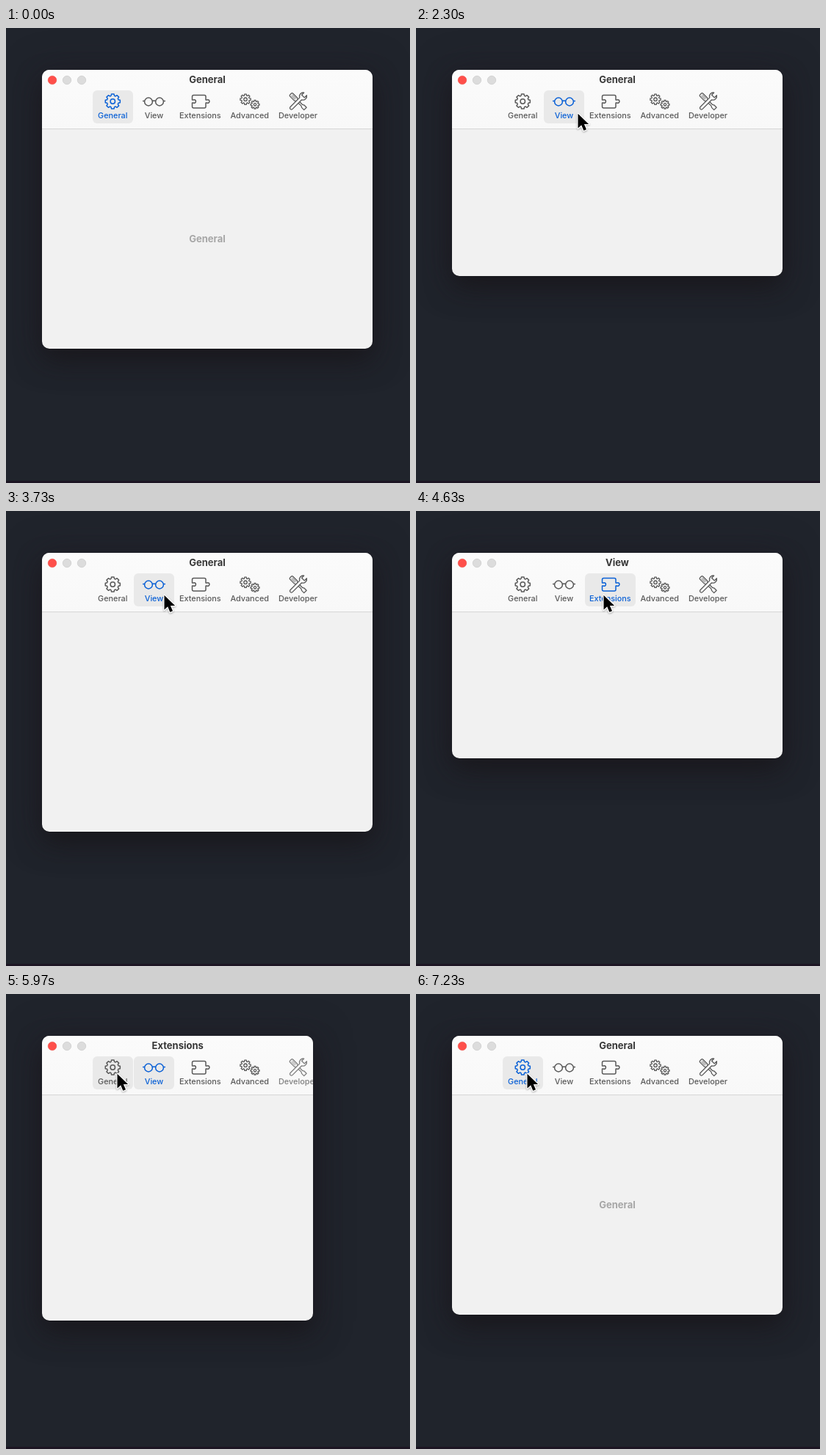
Write an HTML page that moves like this. It is 550x620 px and loops after 8.26 s.

```html
<!DOCTYPE html>
<html lang="en">
<head>
<meta charset="utf-8">
<title>Settings window</title>
<style>
  html, body { margin: 0; width: 100%; height: 100%; overflow: hidden; background: #20242c; }
  #stage { position: absolute; left: 0; top: 0; width: 550px; height: 620px; overflow: hidden; }
  #stage::after { content: ""; position: absolute; left: 0; right: 0; bottom: 0; height: 3px; background: #1c1523; }
  #win {
    position: absolute; left: 49px; top: 57px; overflow: hidden; border-radius: 10px;
    background: #f1f1f1;
    box-shadow: 0 0 1px rgba(0,0,0,.5), 0 16px 34px rgba(20,18,20,.6), 0 4px 50px rgba(38,30,42,.5);
  }
  #bar { position: absolute; left: 0; right: 0; top: 0; height: 80px; background: linear-gradient(#fbfbfb, #f8f8f8); border-bottom: 1px solid #d6d6d6; }
  svg { position: absolute; overflow: visible; }
  #ui { left: -49px; top: -57px; }
  text { font-family: Inter, "Noto Sans", sans-serif; text-anchor: middle; }
  .label { font-size: 10.85px; font-weight: 500; stroke: none; fill: currentColor; }
  .head { font-size: 13px; font-weight: 700; fill: #373737; }
  #body { fill: #a6a6a6; }
  .tab { color: #595959; fill: none; stroke: currentColor; stroke-width: 1.5; stroke-linejoin: round; stroke-linecap: round; }
  .tab .back { fill: #e9e9e9; stroke: none; visibility: hidden; }
  .tab.lit .back { visibility: visible; }
  .tab.on { color: #0b61d6; }
  .thin { stroke-width: 1.3; }
  #cursor { left: 0; top: 0; filter: drop-shadow(0 1px 1px rgba(0,0,0,.3)); }
</style>
</head>
<body>
<div id="stage">
  <div id="win">
    <div id="bar"></div>
    <svg id="ui" width="550" height="620">
      <circle cx="63" cy="71" r="5.8" fill="#fe4f4a" stroke="#e8453f" stroke-width=".5"/>
      <g fill="#dcdcdc" stroke="#cbcbcb" stroke-width=".7">
        <circle cx="83" cy="71" r="5.7"/>
        <circle cx="103" cy="71" r="5.7"/>
      </g>
      <g id="tabs"></g>
      <text id="title" class="head" y="75"></text>
      <text id="body" class="head"></text>
    </svg>
  </div>
  <svg id="cursor" width="20" height="30">
    <path d="M0 .8V20.6L4.7 16.3 7.8 23.8 11.5 22.2 8.4 14.9H14.6Z" fill="#000" stroke="#fff" stroke-width="2.6" stroke-linejoin="round" paint-order="stroke"/>
  </svg>
</div>
<script>
const LOOP = 8260, RESIZE = 250;
const $ = id => document.getElementById(id);

// Toothed outline with a hub.
function gear(cx, cy, inner, outer, hub) {
  const pts = [];
  for (let i = 0; i < 8; i++) {
    for (const [da, r] of [[-.29, inner], [-.17, outer], [.17, outer], [.29, inner]]) {
      const a = i * Math.PI / 4 + da;
      pts.push((cx + r * Math.sin(a)).toFixed(2) + " " + (cy - r * Math.cos(a)).toFixed(2));
    }
  }
  return `<path d="M${pts.join("L")}Z"/><circle cx="${cx}" cy="${cy}" r="${hub}"/>`;
}

const glasses = `<circle cx="194" cy="100.5" r="5.4"/><circle cx="209" cy="100.5" r="5.4"/>
  <path d="M199.3 99.6Q201.5 98.2 203.7 99.6M188.4 99.5H186.6M214.6 99.5H216.4"/>`;
const puzzle = `<path d="M255.5 91.5H270a2 2 0 0 1 2 2V98h1.5a2.3 2.3 0 1 1 0 4H272V107a2 2 0 0 1-2 2
  H255.5a2 2 0 0 1-2-2V102h1.5a2.3 2.3 0 1 0 0-4h-1.5V93.5a2 2 0 0 1 2-2Z"/>`;
const tools = `<g class="thin" transform="translate(397.5 100)">
  <g transform="rotate(-45)">
    <path d="M-2.8-4V-12.5a1.6 1.6 0 0 1 1.6-1.6H1.2a1.6 1.6 0 0 1 1.6 1.6V-4L1.2-2V7.5L2.4 9.5V14H-2.4V9.5L-1.2 7.5V-2Z"/>
    <path d="M-.9-11.5V-5M.9-11.5V-5" stroke-width=".9"/>
  </g>
  <path transform="rotate(45)" fill="#f8f8f8" d="M-2.1 12.6V-5.2A5.2 5.2 0 0 1-2.6-14.2V-9.8H2.6V-14.2A5.2 5.2 0 0 1 2.1-5.2V12.6A2.1 2.1 0 0 1-2.1 12.6Z"/>
</g>`;

const tabs = [
  { name: "General", x: 118, w: 55, mid: 145.3, icon: gear(145.3, 100, 8, 10.2, 3.2), size: [450, 380] },
  { name: "View", x: 174, w: 55, mid: 201.5, icon: glasses, size: [450, 280] },
  { name: "Extensions", x: 230, w: 69, mid: 264.3, icon: puzzle, size: [300, 480] },
  { name: "Advanced", x: 300, w: 63, mid: 331.7, icon: `<g class="thin">${gear(326, 97.2, 5.3, 7.2, 2.2)}${gear(339, 104.3, 4.3, 6, 1.7)}</g>` },
  { name: "Developer", x: 365, w: 65, mid: 397.5, icon: tools }
];
$("tabs").innerHTML = tabs.map(t => `<g class="tab">
  <rect class="back" x="${t.x}" y="85" width="${t.w}" height="45" rx="6"/>
  ${t.icon}<text class="label" x="${t.mid}" y="123">${t.name}</text></g>`).join("");
const tabEls = [...document.querySelectorAll(".tab")];

// Times in ms: button pressed, tab selected, old pane hidden, resize begins.
const switches = [
  { to: 1, press: 1850, select: 1950, hide: 2040, start: 2065 },
  { to: 0, press: 2720, select: 2800, hide: 2870, start: 2900 },
  { to: 1, press: 3560, select: 3620, hide: 3720, start: 3775 },
  { to: 2, press: 4400, select: 4620, hide: 4625, start: 4665 },
  { to: 1, press: 5440, select: 5540, hide: 5850, start: 5852 },
  { to: 0, press: 5680, select: 6570, hide: 6750, start: 6765 }
];

// Pointer stops: time, x, y.
const path = [
  [60, 474, -26], [420, 444, 34], [880, 404, 104], [1370, 291, 108], [1660, 148, 112], [1730, 148, 112],
  [1940, 219, 115], [2480, 219, 115], [2700, 150, 112], [3260, 150, 112], [3520, 214, 113], [4090, 214, 113],
  [4220, 224, 114], [4440, 254, 113], [5290, 254, 113], [5430, 208, 112], [5500, 204, 112], [5690, 150, 107], [LOOP, 150, 107]
];

const clamp = v => Math.max(0, Math.min(1, v));
const ease = u => .5 - .5 * Math.cos(Math.PI * clamp(u));
const mix = (a, b, p) => a + (b - a) * p;

function pointer(t) {
  const i = path.findIndex(k => k[0] > t);
  if (i < 1) return null;
  const [t0, x0, y0] = path[i - 1], [t1, x1, y1] = path[i];
  const u = (t - t0) / (t1 - t0), p = mix(u, ease(u), .5);
  return [mix(x0, x1, p), mix(y0, y1, p)];
}

function draw(t) {
  let selected = 0, pressed = -1, shown = 0, w = 450, h = 380, alpha = 1;
  for (const s of switches) {
    if (t >= s.press && t < s.select) pressed = s.to;
    if (t >= s.select) selected = s.to;
    if (t >= s.hide) alpha = 0;
    if (t >= s.start) {
      const p = ease((t - s.start) / RESIZE), size = tabs[s.to].size;
      w = mix(w, size[0], p);
      h = mix(h, size[1], p);
    }
    const done = s.start + RESIZE + 20;
    if (t >= done) {
      shown = s.to;
      alpha = clamp((t - done) / 80);
    }
  }

  $("win").style.width = w + "px";
  $("win").style.height = h + "px";
  tabEls.forEach((el, i) => {
    el.classList.toggle("on", i === selected);
    el.classList.toggle("lit", i === selected || i === pressed);
    const over = tabs[i].x + tabs[i].w - 49 - w;
    el.style.opacity = 1 - clamp(over / 48);
  });

  const mid = 49 + w / 2;
  for (const el of [$("title"), $("body")]) {
    el.setAttribute("x", mid);
    el.textContent = tabs[shown].name;
  }
  $("body").setAttribute("y", 137 + (h - 80) / 2 + 4.7);
  $("body").style.opacity = alpha;

  const at = pointer(t);
  $("cursor").style.visibility = at ? "visible" : "hidden";
  if (at) $("cursor").style.transform = `translate(${at[0] + 1.5}px, ${at[1] + 1}px)`;
}

const begin = performance.now();
function tick() {
  draw((performance.now() - begin) % LOOP);
  requestAnimationFrame(tick);
}
tick();
</script>
</body>
</html>
```
